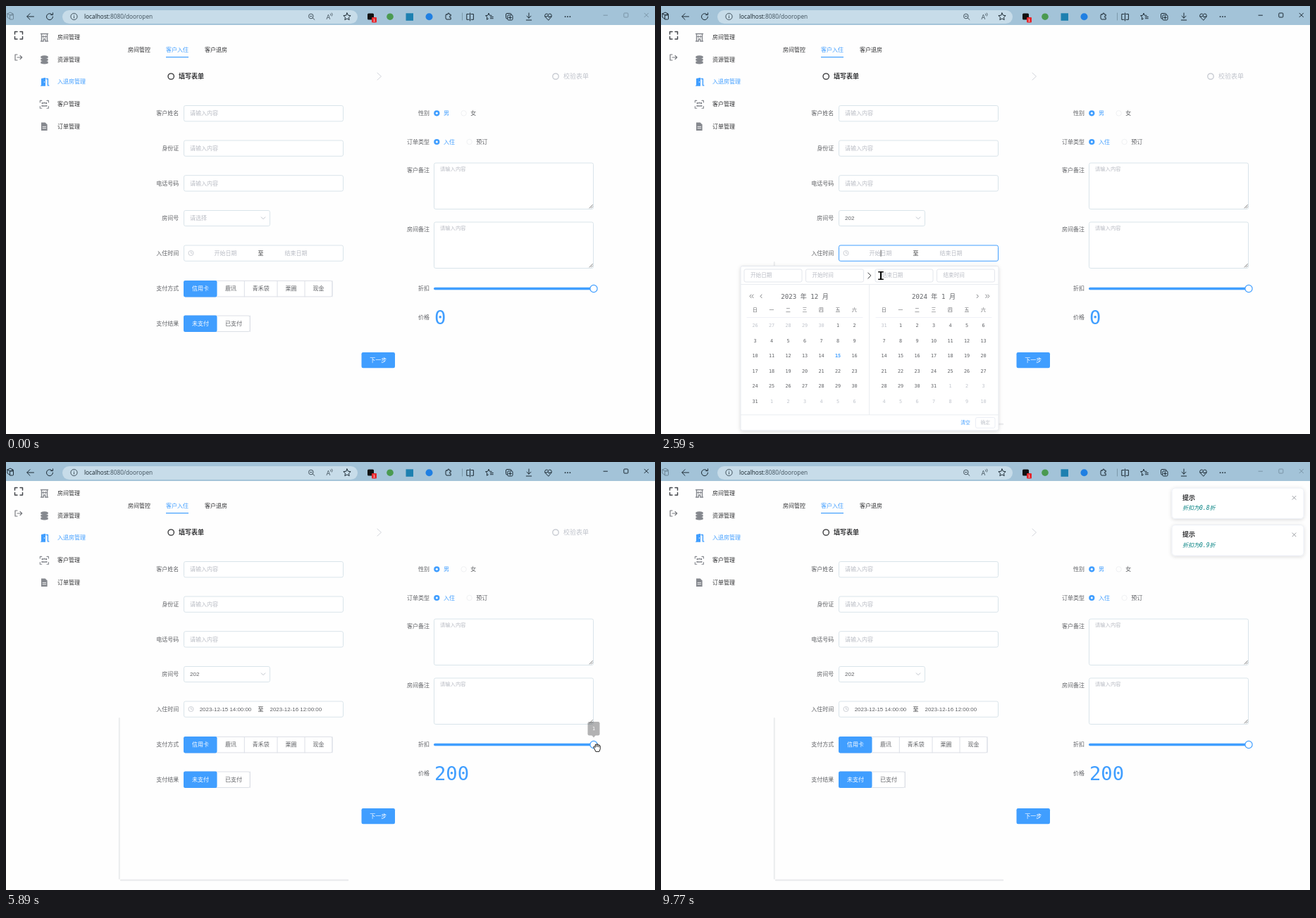
An HTML page that plays this animation: 921 by 608 pixels, repeating every 9.81 s.

```html
<!DOCTYPE html>
<html lang="zh-CN">
<head>
<meta charset="utf-8">
<title>入住登记</title>
<style>
html, body { margin: 0; width: 100%; height: 100%; overflow: hidden; background: #fefefe; }
svg { display: block; width: 921px; height: 608px; }
text { font-family: "Noto Sans CJK SC", "Noto Sans CJK", sans-serif; white-space: pre; }
.mono { font-family: "DejaVu Sans Mono", "Noto Sans CJK SC", monospace; }
.arial { font-family: "Liberation Sans", "Noto Sans CJK SC", sans-serif; }
.url { font-family: "Open Sans", "Noto Sans", sans-serif; }
.b { font-weight: 700; }
.it { font-style: italic; }
.strike { text-decoration: line-through; }
.ln { fill: none; stroke-linecap: round; stroke-linejoin: round; }
</style>
</head>
<body>
<svg id="stage" viewBox="0 0 921 608" xmlns="http://www.w3.org/2000/svg">
<defs>
  <clipPath id="listClip"><rect x="252" y="320" width="123" height="145"/></clipPath>
  <filter id="shade" x="-10%" y="-15%" width="120%" height="135%">
    <feDropShadow dx="0" dy="1.2" stdDeviation="2.6" flood-color="#000" flood-opacity=".14"/>
  </filter>
</defs>
</svg>
<script>
const LOOP = 9810, STEP = 94.6;
const BLUE = '#409eff', INK = '#303133', BODY = '#606266', HINT = '#b9bcc4', EDGE = '#d9e4ea', PALE = '#ebeef5';
const BAR = '#a3c3d8', DARK = '#1d2b35';

// Text is placed by its vertical centre.
const text = (x, y, s, o = {}) => {
  const size = o.size || 8;
  return `<text x="${x}" y="${(y + size * .36).toFixed(2)}" font-size="${size}" fill="${o.fill || BODY}"` +
    ` text-anchor="${o.at || 'start'}" class="${o.cls || ''}"${o.id ? ` id="${o.id}"` : ''}>${s}</text>`;
};
const mid = (x, y, s, o = {}) => text(x, y, s, { ...o, at: 'middle' });
const box = (x, y, w, h, o = {}) =>
  `<rect x="${x}" y="${y}" width="${w}" height="${h}" rx="${o.r ?? 2.3}" fill="${o.fill || '#fff'}"` +
  ` stroke="${o.edge || 'none'}" stroke-width="${o.w || 1}"${o.id ? ` id="${o.id}"` : ''}/>`;
const line = (d, color = DARK, w = 1) => `<path class="ln" d="${d}" stroke="${color}" stroke-width="${w}"/>`;
const ring = (x, y, r, color = DARK, w = 1, fill = 'none') =>
  `<circle cx="${x}" cy="${y}" r="${r}" fill="${fill}" stroke="${color}" stroke-width="${w}"/>`;
const dot = (x, y, r, fill) => `<circle cx="${x}" cy="${y}" r="${r}" fill="${fill}"/>`;
const group = (id, s, more = '') => `<g id="${id}" ${more}>${s}</g>`;
const star = (x, y, r) => {
  let d = '';
  for (let i = 0; i < 10; i++) {
    const a = Math.PI * (i / 5 - .5), k = i % 2 ? r * .48 : r;
    d += (i ? 'L' : 'M') + (x + k * Math.cos(a)).toFixed(2) + ' ' + (y + k * Math.sin(a)).toFixed(2);
  }
  return line(d + 'Z');
};

function browserBar() {
  return box(0, 0, 921, 27, { fill: BAR, r: 0 }) + box(80, 6, 419, 19, { fill: '#c7dce9', r: 9.5 }) +
    group('tabs', line('M2 11l4-2 4 2v6M2 11v5l4 3v-6M2 11l4 2 4-2v4M6 13v6') + box(5.5, 13, 5, 6, { fill: BAR, edge: DARK, r: 1 })) +
    line('M39.5 15H30M34 10.7L29.7 15l4.3 4.3M66.5 15.2a4.5 4.5 0 1 1-1.4-3.3M66.5 9.8v2.8h-2.8') +
    ring(96.5, 15, 4.6, '#44545e') + line('M96.5 14.7v2.4M96.5 12.8v.1', '#44545e') +
    text(111, 15.2, '<tspan fill="#17242c">localhost</tspan>:8080/dooropen', { cls: 'url', size: 8.3, fill: '#40515c' }) +
    ring(432.8, 14.5, 3.3, '#44545e') + line('M435.3 17l2.6 2.4M431.5 14.5h2.6', '#44545e') +
    text(454.5, 15.5, 'A', { cls: 'url', size: 9, fill: '#44545e' }) + line('M460.5 11q1.2 1 0 2.4M462.4 10q1.8 2 0 4.2', '#44545e', .8) +
    star(484, 15.3, 5.4) +
    box(513, 10.5, 9, 9, { fill: '#111', r: 1.5 }) + box(519, 16, 7, 7.5, { fill: '#e5262c', r: 1 }) +
    mid(522.5, 19.8, '1', { cls: 'arial', size: 6, fill: '#fff' }) +
    dot(545, 15.2, 4.8, '#4a9a50') + box(567.5, 10.3, 10.5, 10.5, { fill: '#1d80b0', r: 0 }) + dot(600.5, 15.3, 5, '#1f7fe2') +
    line('M625 12h2q-.6-2 1-2t1 2h2.2v2.3q-1.8-.6-1.8 1t1.8 1v2.7h-6.2q-1-1-1-2v-4q0-1 1-1Z') +
    line('M647.5 10v10', '#7c99ab') +
    line('M658.5 10v11M655 11.5h-1.2v7.8h3.2M662 11.5h1.4v7.8h-3.2M657 11.5h-2.5M660 11.5h2.5') +
    line('M685 10.5l1.2 2.7 3 .3M685 10.5l-1.4 2.8-3 .4 2.2 2.1-.5 3.4 2.2-1.2M687.3 15.5h4M687.3 17.7h4') +
    box(709.5, 10.5, 7.5, 7.5, { fill: 'none', edge: DARK, r: 1.5 }) + box(711.8, 12.8, 7.2, 7.2, { fill: BAR, edge: DARK, r: 1.5 }) + line('M715.4 14.5v3.8M713.5 16.4h3.8') +
    line('M742 10v7M739 14.2l3 3 3-3M738.3 20h7.4') +
    line('M769.5 20l-4.2-4.4q-1.6-2.2.3-4.1 2-1.2 3.9.7 1.9-1.9 3.9-.7 1.9 1.9.3 4.1ZM765 15h3l1.3-1.8 1.4 3.2 1-1.4h2.4') +
    [793.6, 797, 800.4].map(x => dot(x, 15.2, .9, DARK)).join('') +
    group('winBtns', line('M848 13.2h5.5M906 10.2l5.5 5.5M911.5 10.2l-5.5 5.5') + box(876.8, 10, 6, 6, { fill: 'none', edge: DARK, r: 1 }));
}

function sidebar() {
  const gray = '#85888e';
  const names = ['房间管理', '资源管理', '入退房管理', '客户管理', '订单管理'];
  let s = line('M12.5 40v-3.5h3.5M20 36.5h3.5V40M23.5 43.5V47H20M16 47h-3.5v-3.5', '#44474c', 1.5) +
    line('M16 69h-3v8h3M16 73h6.5M20 70.3l2.7 2.7-2.7 2.7', '#77797e', 1.2);
  names.forEach((n, i) => s += text(73, 44 + i * 31.7, n, { fill: i === 2 ? BLUE : INK }));
  s += line('M49.5 39.5h10M50.5 40v10M58.5 40v10M49.5 50h3.8v-3h2.4v3h3.8', gray, 1.4) +
    line('M53 42v3M56 42v3M51 43.5h7', gray, 1.1);
  for (const y of [72.4, 76.2, 80]) s += `<path d="M49.3 ${y - 1}q5.2 -2.4 10.4 0v2.4q-5.2 2.2 -10.4 0Z" fill="${gray}"/>`;
  s += `<path d="M50 103l6-1.2v12h-7v-1h1Z" fill="${BLUE}"/>` + line('M57 103.5h2.4v9.4h1.4', BLUE, 1.4) + dot(54.4, 108, .7, '#fff');
  s += line('M48.3 137v-2.6h2.4M58 134.4h2.4v2.6M60.4 142.6v2.6H58M50.7 145.2h-2.4v-2.6', gray, 1.1) +
    [[51.7, 138], [54.4, 137.6], [57.1, 138]].map(p => dot(...p, 1.2, gray)).join('') + line('M51 141.8h1.4M53.6 142h1.6M56.6 141.8h1.2', gray, 1.7);
  s += `<path d="M50 165.5h5.6l3 3v8.4h-8.6Z" fill="${gray}"/>` + line('M52 171.4h4.6M52 173.8h4.6', '#fff', .9);
  return s;
}

function buttons(y, edges, labels) {
  const end = edges[edges.length - 1];
  let s = box(252.5, y, end - 252.5, 22.5, { edge: '#dcdfe6' }) + box(252, y - .5, 47.5, 23.5, { fill: BLUE });
  labels.forEach((n, i) => {
    if (i) s += line(`M${edges[i + 1]} ${y}v22.5`, '#dcdfe6');
    s += mid((edges[i] + edges[i + 1]) / 2, y + 11.2, n, { fill: i ? BODY : '#fff' });
  });
  return s;
}

function form() {
  let s = text(173, 62, '房间管控', { fill: INK }) + text(227, 62, '客户入住', { fill: BLUE }) + text(282, 62, '客户退房', { fill: INK }) +
    box(227, 72, 32, 1.2, { fill: BLUE, r: 0 }) +
    ring(234.2, 100, 4.2, INK, 1.3) + text(245, 100, '填写表单', { size: 9, cls: 'b', fill: INK }) +
    line('M527 95l5.5 5-5.5 5', '#d3d6dc') + ring(780, 100, 4.2, '#c0c4cc', 1.2) + text(791, 100, '校验表单', { size: 9, fill: '#c0c4cc' });
  ['客户姓名', '身份证', '电话号码', '房间号', '入住时间', '支付方式', '支付结果']
    .forEach((n, i) => s += text(245.3, 152.3 + i * 49.75, n, { at: 'end' }));
  [['性别', 152.3], ['订单类型', 193], ['客户备注', 233.3], ['房间备注', 317.5], ['折扣', 401.5], ['价格', 442]]
    .forEach(([n, y]) => s += text(601, y, n, { at: 'end' }));
  for (const y of [141.5, 191, 240.7]) s += box(252.5, y, 226, 22.3, { edge: EDGE }) + text(261, y + 11, '请输入内容', { fill: HINT });
  for (const y of [223, 307]) {
    s += box(607.5, y, 226, 65.5, { edge: EDGE }) + text(616, y + 8.6, '请输入内容', { fill: HINT, size: 7.3 }) +
      line(`M828 ${y + 64}l4.5-4.5M830.5 ${y + 64}l2-2`, '#777', .9);
  }
  const radio = (y, on, off, ox) => dot(611.3, y, 4.1, BLUE) + dot(611.3, y, 1.5, '#fff') +
    text(621, y, on, { fill: BLUE }) + ring(ox - 9.7, y, 3.7, '#f0f1f3') + text(ox, y, off);
  s += radio(152.3, '男', '女', 659.3) + radio(193, '入住', '预订', 667.3);

  s += box(252.5, 290.5, 122, 22, { edge: EDGE, id: 'roomBox' }) + text(261, 301.3, '请选择', { fill: HINT, id: 'roomHint' }) +
    text(261, 301, '202', { cls: 'arial', id: 'room' }) + group('caretRoom', line('M261.5 297v8.5', INK, .8)) +
    group('arrow', line('M-2.8 -1.4L0 1.4l2.8 -2.8', '#c0c4cc'));
  s += box(252.5, 340, 226, 22.3, { edge: EDGE, id: 'dateBox' }) + ring(262.5, 351, 3.5, '#c0c4cc', .8) + line('M262.5 349v2.2h1.6', '#c0c4cc', .8) +
    mid(361.5, 351, '至', { fill: INK }) +
    group('dateHint', mid(311.5, 351, '开始日期', { fill: HINT }) + mid(411.5, 351, '结束日期', { fill: HINT })) +
    group('dates', mid(311.5, 350.8, '2023-12-15 14:00:00', { cls: 'arial', size: 7.93 }) + mid(411.3, 350.8, '2023-12-16 12:00:00', { cls: 'arial', size: 7.93 })) +
    group('caretDate', line('M312 347v8.5', INK, .8));
  s += buttons(390.4, [252.5, 299.5, 338.3, 385, 424, 463], ['信用卡', '鹿讯', '青禾袋', '栗圃', '现金']) +
    buttons(440, [252.5, 299.5, 346.3], ['未支付', '已支付']);
  s += box(504.5, 492, 47.5, 22.3, { fill: BLUE }) + mid(528.2, 503, '下一步', { fill: '#fff' });

  s += box(607, 399.8, 227, 3.4, { fill: '#e4e7ed', r: 1.7 }) + box(607, 399.8, 227, 3.4, { fill: BLUE, r: 1.7, id: 'fill' }) +
    group('knob', ring(0, 401.5, 5.1, BLUE, 1.2, '#fff')) +
    group('tip', `<path d="M-2.8 388h5.6L0 391.5Z" fill="${INK}"/>` + box(-12, 369, 24, 19.5, { fill: INK, id: 'tipBox' }) +
      mid(0, 379, '1', { cls: 'mono', size: 6.8, fill: '#fff', id: 'tipText' }));
  s += text(608, 442.3, '0', { cls: 'mono', size: 27.2, fill: BLUE, id: 'price' }) +
    text(658.5, 449.7, '原价: 200', { cls: 'mono b strike', size: 8.3, fill: INK, id: 'full' });
  return s;
}

function roomList() {
  let s = box(252.5, 320, 122.5, 145, { edge: '#e4e7ed' }).replace('/>', ' filter="url(#shade)"/>') + '<g clip-path="url(#listClip)">';
  [202, 203, 204, 205, 206, 208, 302, 303].forEach((n, i) => s += text(264, 332.3 + i * 19.15, n, { cls: 'mono' }));
  return group('list', s + '</g>');
}

const colX = (side, c) => 133.5 + side * 183 + c * 23.5;
const rowY = r => 454 + r * 21.45;
const cells = [];

function month(side, title, lead, prevLen, len) {
  let s = mid(204 + side * 183, 412.3, title, { cls: 'mono', size: 9.1 });
  [...'日一二三四五六'].forEach((n, c) => s += mid(colX(side, c), 431.5, n, { size: 6.8 }));
  s += line(`M${122 + side * 183} 442.5h164`, PALE, .8);
  for (let i = 0; i < 42; i++) {
    const d = i - lead + 1, inside = d > 0 && d <= len, x = colX(side, i % 7), y = rowY(Math.floor(i / 7));
    const today = !side && d === 15, id = `d${side}_${i}`;
    s += mid(x, y, d < 1 ? d + prevLen : inside ? d : d - len,
      { cls: today ? 'mono b' : 'mono', size: 6.8, fill: today ? BLUE : inside ? BODY : '#c0c4cc', id });
    if (inside) cells.push({ id, x, y, side, d });
  }
  return s;
}

function picker() {
  const y15 = rowY(2);
  let s = box(113, 369.5, 366, 233.5, { edge: '#e4e7ed' }).replace('/>', ' filter="url(#shade)"/>');
  const fields = [118, 205.5, 304, 391.5];
  ['开始日期', '开始时间', '结束日期', '结束时间'].forEach((n, i) =>
    s += box(fields[i], 374, 82, 18, { edge: '#e3e6ec', id: 'in' + i }) + text(fields[i] + 9, 382.7, n, { cls: 'arial', size: 7.6, fill: HINT, id: 'inText' + i }));
  s += line('M293.8 379l4 4-4 4', INK) + line('M113.5 395.5h365M295.5 396v184.5M113.5 580.8h365', '#e8ebf0', .9) +
    line('M128 410l-2 2.3 2 2.3M131 410l-2 2.3 2 2.3M143 410l-2 2.3 2 2.3M448.3 410l2 2.3-2 2.3M460.8 410l2 2.3-2 2.3M463.8 410l2 2.3-2 2.3', BODY, .8) +
    group('span', box(colX(0, 5) - 11, y15 - 8, 46, 16, { fill: '#eef4fc', r: 8 })) +
    group('mark15', dot(colX(0, 5), y15, 7.3, BLUE)) + group('mark16', dot(colX(0, 6), y15, 7.3, BLUE)) +
    month(0, '2023 年 12 月', 5, 30, 31) + month(1, '2024 年 1 月', 1, 31, 31) +
    mid(432, 592, '清空', { size: 6.8, fill: BLUE }) + box(446.5, 584.5, 27.5, 15, { edge: PALE }) +
    mid(460.3, 592, '确定', { size: 6.8, fill: '#c0c4cc', id: 'ok' });
  return group('picker', s);
}

function notice(id, y, rate) {
  return group(id, box(725, y, 187, 43.5, { r: 4.5, edge: PALE }).replace('/>', ' filter="url(#shade)"/>') +
    text(740, y + 13.5, '提示', { size: 9, cls: 'b', fill: INK }) +
    text(740, y + 28.5, `折扣为${rate}折`, { cls: 'mono it', fill: '#008080' }) +
    line(`M896 ${y + 11.3}l5 5M901 ${y + 11.3}l-5 5`, '#909399', .9));
}

function cursors() {
  const grip = 'M-4 1.2L-5.2-.8q0-1.4 1.4-.6l1 1V-4q.9-1.3 1.8 0v-1q.9-1.2 1.8 0v1q.9-1.1 1.8 0v1q1-1 1.8.2V1.8L3 5.5h-5Z';
  return group('pointer',
    group('c-arrow', `<path d="M0 0v12l2.8-2.6 1.9 4.2 1.8-.8-1.9-4.1h3.8Z" fill="#fff" stroke="#111" stroke-width=".9"/>`) +
    group('c-hand', `<path d="M-1.4.8Q0-.8 1.4.8L1.9 5 7 6.3q1.7.7 1.2 2.7L6.8 14.5H.4L-3.4 9q-.8-2 1-1.8l1.6 1.2Z" fill="#000"/>`) +
    group('c-beam', line('M-3.2 -5.2h6.4M-3.2 5.2h6.4', '#000', 1.6) + line('M0 -5v10', '#000', 2)) +
    group('c-grab', `<path d="${grip}" fill="#fff" stroke="#222" stroke-width="1" stroke-linejoin="round"/>` + line('M-1 -4v2.6M.8 -4v2.6M2.6 -3v2', '#222', .8)));
}

const stage = document.getElementById('stage');
stage.insertAdjacentHTML('beforeend',
  box(0, 27, 921, 581, { fill: '#fefefe', r: 0 }) + browserBar() + sidebar() + form() +
  group('trace', line('M160.8 364v228', '#ebecee', 2) + line('M163 594h322', '#ebecee', 2.4)) +
  roomList() + picker() + notice('note1', 37, '0.8') + notice('note2', 89.5, '0.9') + cursors());

const el = {};
stage.querySelectorAll('[id]').forEach(e => el[e.id] = e);
const show = (id, on) => el[id].style.display = on ? '' : 'none';
const put = (id, k, v) => el[id].setAttribute(k, v);
const clamp = v => Math.min(1, Math.max(0, v));
const ramp = (t, a, b) => clamp((t - a) / (b - a));
const smooth = p => p * p * (3 - 2 * p);
const at = (t, list) => list.filter(k => k[0] <= t).pop();

const path = [
  [310, 600, 570], [1270, 273, 303], [1840, 273, 303], [1930, 268, 330], [2040, 268, 330], [2300, 312, 351], [2490, 312, 351],
  [2580, 312, 383], [2770, 285, 438], [3120, 214, 494], [3520, 257, 500], [4290, 257, 500], [4470, 279, 500], [4570, 279, 500],
  [4950, 462, 592], [5240, 462, 592], [5840, 839, 406], [6250, 836, 403], [6640, 789, 402], [7290, 789, 402], [7470, 811.5, 402],
  [7900, 811.5, 402], [8300, 836, 403], [8680, 836, 403], [9060, 892, 612]
];
const shapes = [[0, 'arrow'], [1080, 'hand'], [2210, 'beam'], [2660, 'hand'], [5330, 'arrow'], [5800, 'grab'], [8780, 'arrow']];

function pointerAt(t) {
  const i = path.findIndex(k => k[0] > t);
  if (i < 0) return path[path.length - 1].slice(1);
  const a = path[Math.max(0, i - 1)], b = path[i], p = smooth(ramp(t, a[0], b[0]));
  return [a[1] + (b[1] - a[1]) * p, a[2] + (b[2] - a[2]) * p];
}

function unfold(id, y, scale, opacity) {
  show(id, opacity > 0);
  put(id, 'transform', `translate(0 ${y}) scale(1 ${scale}) translate(0 ${-y})`);
  put(id, 'opacity', opacity);
}

function draw(now) {
  const t = now < 296 ? 0 : 310 + Math.floor((now - 296) / STEP) * STEP;
  const active = now >= 310 && now < 9770;
  put('tabs', 'opacity', active ? 1 : .4);
  put('winBtns', 'opacity', active ? 1 : .3);

  const [x, y] = pointerAt(t), shape = at(t, shapes)[1];
  show('pointer', t >= 310 && t < 9060);
  put('pointer', 'transform', `translate(${x.toFixed(2)} ${y.toFixed(2)})`);
  for (const s of ['arrow', 'hand', 'beam', 'grab']) show('c-' + s, s === shape);

  const picked = t >= 2010, openList = t >= 1350 && !picked;
  put('roomBox', 'stroke', t >= 1350 && t < 2380 ? BLUE : EDGE);
  put('arrow', 'transform', `translate(365 301.3) rotate(${openList ? 180 : 0})`);
  show('roomHint', !picked);
  show('room', picked);
  show('caretRoom', openList);
  const listIn = ramp(t, 1260, 1440), listOut = ramp(t, 2010, 2300);
  unfold('list', 320, openList ? .2 + .8 * listIn : 1 - .8 * listOut, t < 1350 ? 0 : picked ? 1 - listOut : listIn);

  const open = t >= 2380 && t < 5230;
  put('dateBox', 'stroke', open ? BLUE : EDGE);
  show('caretDate', open && t < 3600 && (t - 2380) % 1060 < 530);
  show('dateHint', t < 5230);
  show('dates', t >= 5230);
  const popIn = ramp(t, 2380, 2570), popOut = ramp(t, 5140, 5420);
  unfold('picker', 369, (.4 + .6 * popIn) * (1 - .5 * popOut), popIn * (1 - popOut));
  show('trace', t >= 2480);

  const stageNo = t >= 4470 ? 2 : t >= 3690 ? 1 : 0;
  const values = [
    ['开始日期', '开始时间', '结束日期', '结束时间'],
    ['2023-12-15', '14:00:00', '2023-12-15', '14:00:00'],
    ['2023-12-15', '14:00:00', '2023-12-16', '12:00:00']
  ][stageNo];
  values.forEach((v, i) => {
    el['inText' + i].textContent = v;
    put('inText' + i, 'fill', stageNo === 2 ? BODY : HINT);
    put('in' + i, 'fill', stageNo === 1 ? '#f5f7fa' : '#fff');
  });
  put('ok', 'fill', stageNo === 2 ? BODY : '#c0c4cc');
  show('mark15', stageNo > 0);
  show('mark16', stageNo > 1);
  show('span', stageNo > 1);
  for (const c of cells) {
    const first = !c.side && c.d === 15, chosen = first && stageNo > 0 || !c.side && c.d === 16 && stageNo > 1;
    const over = open && shape === 'hand' && Math.abs(c.x - x) < 11.7 && Math.abs(c.y - y) < 10.7;
    put(c.id, 'fill', chosen ? '#fff' : first || over ? BLUE : BODY);
  }

  const rate = at(t, [[0, 1], [6440, .9], [6540, .8], [7390, .9], [8100, 1]])[1];
  const kx = 607 + 227 * rate, half = rate === 1 ? 8.5 : 12;
  put('fill', 'width', kx - 607);
  put('knob', 'transform', `translate(${kx} 0)`);
  put('tip', 'transform', `translate(${kx} 0)`);
  put('tip', 'opacity', Math.min(ramp(t, 5800, 6050), 1 - ramp(t, 8680, 8880)));
  put('tipBox', 'x', -half);
  put('tipBox', 'width', half * 2);
  el.tipText.textContent = rate;
  const price = at(t, [[0, 0], [5230, 200], [6720, 160], [7660, 180], [8400, 200]])[1];
  el.price.textContent = price;
  show('full', price === 160 || price === 180);

  [['note1', 6720], ['note2', 7660]].forEach(([id, start]) => {
    const p = ramp(t, start, start + 300);
    show(id, t >= start);
    put(id, 'transform', `translate(${(196 * (1 - p) ** 2).toFixed(2)} 0)`);
  });
}

const began = performance.now();
function tick() {
  draw((performance.now() - began) % LOOP);
  requestAnimationFrame(tick);
}
tick();
</script>
</body>
</html>
```
